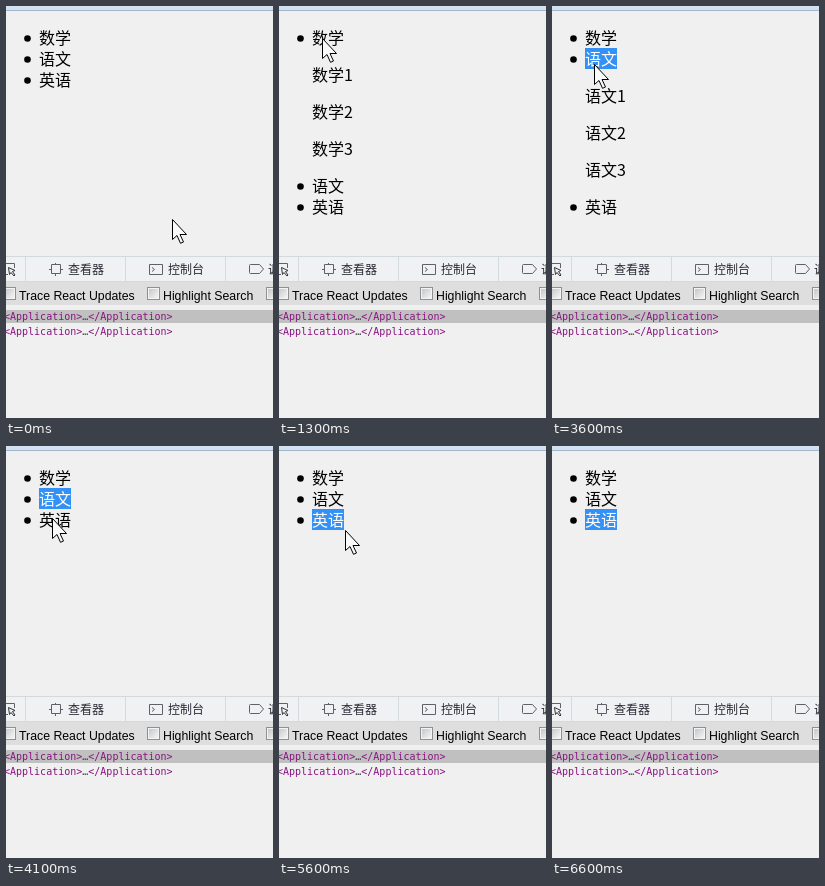
Recreate the animation shown at these times as an HTML page. Size 267 by 412 pixels, loop 8 s.

```html
<!DOCTYPE html>
<html lang="zh-CN">
<head>
<meta charset="utf-8">
<title>Subject list</title>
<style>
  html, body { margin: 0; width: 100%; height: 100%; overflow: hidden; background: #f0f0f0; }
  svg { display: block; width: 267px; height: 412px; }
  text { white-space: pre; }
  .item { font: 16px "Noto Sans CJK SC", "Noto Sans CJK", sans-serif; }
  .tab { font: 12px "Noto Sans CJK SC", "Noto Sans CJK", sans-serif; fill: #2a2a36; }
  .option { font: 12.3px "Liberation Sans", Arial, sans-serif; }
  .node { font: 10px "DejaVu Sans Mono", monospace; fill: #881280; }
  .tip { font: 10.6px "Open Sans", sans-serif; }
  .icon { fill: none; stroke: #5c6268; }
</style>
</head>
<body>
<svg viewBox="0 0 267 412">
  <defs>
    <linearGradient id="check" x2="1" y2="1">
      <stop stop-color="#c4c8cd"/>
      <stop offset="1" stop-color="#f4f4f4"/>
    </linearGradient>
  </defs>
  <rect width="267" height="412" fill="#f0f0f0"/>
  <rect width="267" height="4" fill="#d3e2f2"/>
  <rect y="4" width="267" height="1" fill="#a3b5c8"/>

  <g id="list"></g>

  <g id="overlay">
    <rect y="21" width="267" height="63" fill="rgb(112,163,191)" fill-opacity=".64"/>
    <rect x="-1.5" y="89.5" width="142" height="23" fill="#f1f1b0" stroke="#a3a38c"/>
    <text class="tip" x="4" y="105" fill="#8a1386">Application</text>
    <text class="tip" x="64" y="105" fill="#77775f">1350px × 63px</text>
  </g>

  <g id="tools">
    <rect y="250" width="267" height="26" fill="#f0f1f2"/>
    <path d="M0 250.5H267M0 275.5H267M19.5 251V275M119.5 251V275M219.5 251V275" stroke="#d3dade"/>
    <g class="icon">
      <path d="M0 257.5H8.500V262M0 268.500H2"/>
      <path d="M2.500 261.500L9 264.500L6.500 265.500L9 269L8 270L5 266.500L3.500 268.500Z" stroke="#303438"/>
      <path d="M45.500 258.500H54.500V267.500H45.500ZM49.500 257V258M49.500 268V270M43 263.500H45M55 263.500H57"/>
      <path d="M143.500 258.500H156.500V268.500H143.500ZM146 261.500L148.500 263.500L146 265.500"/>
      <path d="M244.500 258.500H253.500L257.500 263L253.500 267.500H244.500Q243.500 267.500 243.500 266.500V259.500Q243.500 258.500 244.500 258.500Z"/>
    </g>
    <text class="tab" x="62" y="268">查看器</text>
    <text class="tab" x="162" y="268">控制台</text>
    <text class="tab" x="262" y="268">调试器</text>

    <rect y="276" width="267" height="23" fill="#dedede"/>
    <text class="option" x="13" y="294">Trace React Updates</text>
    <text class="option" x="157" y="294">Highlight Search</text>

    <rect y="304" width="267" height="13" fill="#c0c0c0"/>
  </g>

  <path id="cursor" d="M.5 .5V20.500L5 16.500L8.500 24.300L11.500 23L8 15.500H14.500Z" fill="#fafafa" stroke="#000" stroke-linejoin="round"/>
</svg>
<script>
const NS = "http://www.w3.org/2000/svg";
const $ = id => document.getElementById(id);
const add = (parent, tag, attrs, text = "") => {
  const el = document.createElementNS(NS, tag);
  for (const key in attrs) el.setAttribute(key, attrs[key]);
  el.textContent = text;
  return parent.appendChild(el);
};
const show = (el, on) => el.setAttribute("visibility", on ? "visible" : "hidden");

const LOOP = 8000, ROW = 21, PARA = 37, OPEN = 127;

const items = ["数学", "语文", "英语"].map(name => {
  const group = add($("list"), "g", {});
  const mark = add(group, "rect", { x: 33, y: 0, width: 32, height: ROW, fill: "#3390f5" });
  add(group, "circle", { cx: 21.5, cy: 11.5, r: 3.3 });
  const label = add(group, "text", { class: "item", x: 33, y: 17 }, name);
  const paras = [1, 2, 3].map(n =>
    add(group, "text", { class: "item", x: 33, y: 17 + n * PARA }, name + n));
  return { group, mark, label, paras };
});

for (const x of [-3, 141, 260]) {
  add($("tools"), "rect", { x: x + .5, y: 281.5, width: 12, height: 12, fill: "#f4f4f4", stroke: "#8e8f8f" });
  add($("tools"), "rect", { x: x + 2, y: 283, width: 9, height: 9, fill: "url(#check)" });
}
for (const y of [314, 329]) {
  const row = add($("tools"), "text", { class: "node", x: -2, y }, "<Application>");
  add(row, "tspan", { fill: "#444" }, "…");
  add(row, "tspan", {}, "</Application>");
}

// start time, open item, selected item, cursor position, overlay
const steps = [
  [0, -1, -1, [166, 213]],
  [300, -1, -1, [59, 56]],
  [800, -1, -1, [43, 32]],
  [1300, 0, -1, [43, 32]],
  [1800, -1, -1, [42, 42]],
  [2600, -1, -1, [42, 58]],
  [3100, 1, -1, [42, 58]],
  [3600, 1, 1, [42, 58]],
  [4100, -1, 1, [46, 72]],
  [4600, -1, -1, [48, 81]],
  [5100, 2, -1, [48, 81]],
  [5600, -1, 2, [66, 84]],
  [6100, -1, 2, null, true],
  [6600, -1, 2, null]
];

let current;
function draw() {
  const t = performance.now() % LOOP;
  const step = steps.findLast(s => s[0] <= t);
  if (step !== current) {
    current = step;
    const [, open, selected, pos, overlay] = step;
    items.forEach((item, i) => {
      const y = 21 + i * ROW + (open >= 0 && i > open ? OPEN : 0);
      item.group.setAttribute("transform", `translate(0 ${y})`);
      item.label.setAttribute("fill", i === selected ? "#fff" : "#000");
      show(item.mark, i === selected);
      item.paras.forEach(p => show(p, i === open));
    });
    show($("overlay"), overlay);
    show($("cursor"), pos);
    if (pos) $("cursor").setAttribute("transform", `translate(${pos})`);
  }
  requestAnimationFrame(draw);
}
draw();
</script>
</body>
</html>
```
